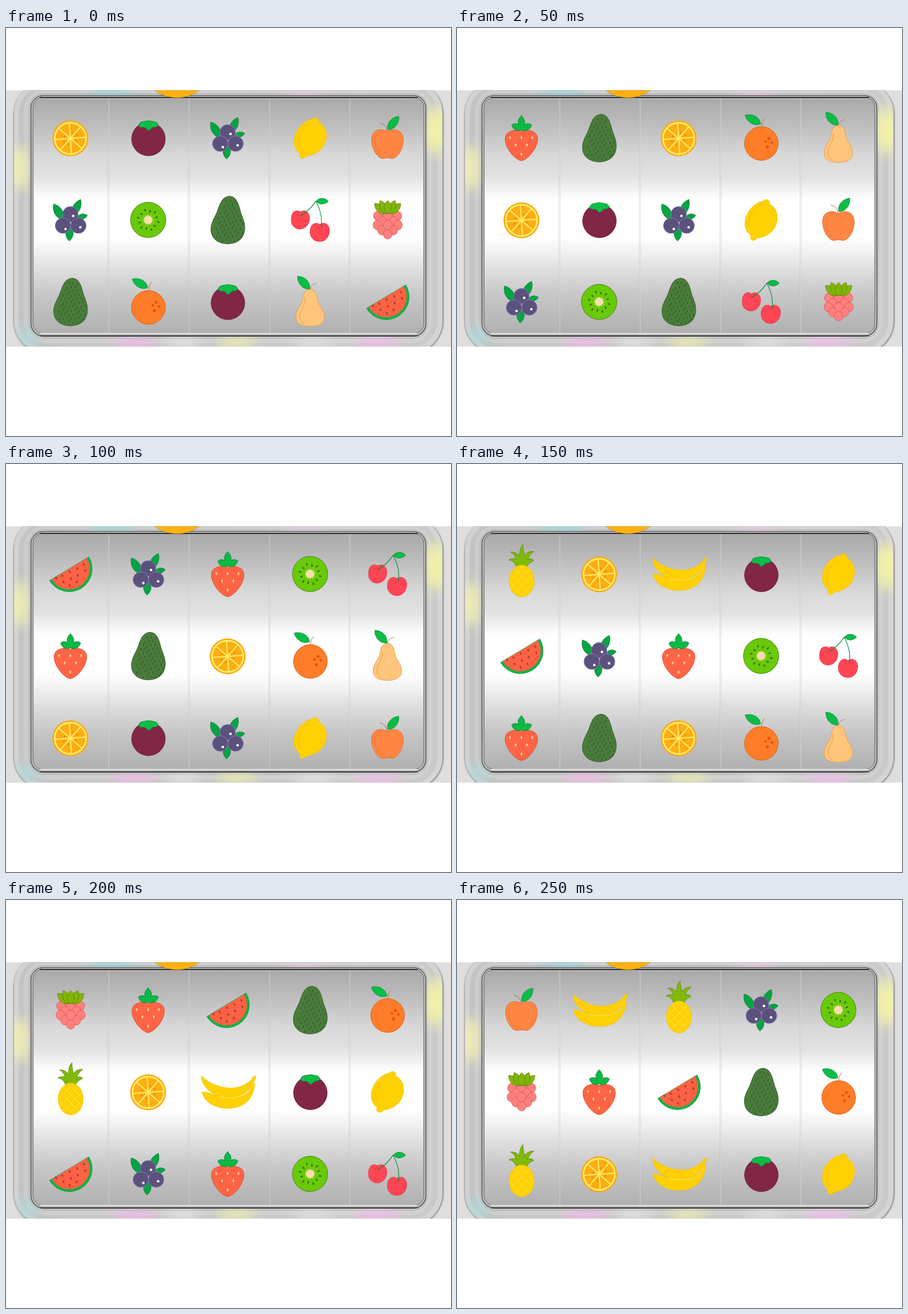
An HTML page for the animation above (0.3 s loop, 781 by 717 pixels).

```html
<!DOCTYPE html>
<html lang="en">
<head>
<meta charset="utf-8">
<title>Fruit reels</title>
<style>
html, body { margin: 0; width: 100%; height: 100%; overflow: hidden; background: #fff; }
svg { display: block; width: 100vw; height: 100vh; }
</style>
</head>
<body>
<svg id="stage" viewBox="0 0 781 717" preserveAspectRatio="none">
  <defs>
    <linearGradient id="drum" x1="0" y1="123" x2="0" y2="538" gradientUnits="userSpaceOnUse">
      <stop offset="0" stop-color="#a9a9a9"/>
      <stop offset=".12" stop-color="#bebebe"/>
      <stop offset=".25" stop-color="#d9d9d9"/>
      <stop offset=".33" stop-color="#e1e1e1"/>
      <stop offset=".37" stop-color="#ededed"/>
      <stop offset=".43" stop-color="#fff"/>
      <stop offset=".59" stop-color="#fff"/>
      <stop offset=".65" stop-color="#f2f2f2"/>
      <stop offset=".73" stop-color="#dedede"/>
      <stop offset=".84" stop-color="#c6c6c6"/>
      <stop offset="1" stop-color="#b0b0b0"/>
    </linearGradient>
    <linearGradient id="metal">
      <stop offset="0" stop-color="#c4c4c4"/>
      <stop offset=".2" stop-color="#cecece"/>
      <stop offset=".5" stop-color="#cccccc"/>
      <stop offset=".8" stop-color="#dadada"/>
      <stop offset="1" stop-color="#cecece"/>
    </linearGradient>
    <filter id="soft" x="-100%" y="-100%" width="300%" height="300%"><feGaussianBlur stdDeviation="11"/></filter>
    <filter id="edge"><feGaussianBlur stdDeviation="1.2"/></filter>
    <clipPath id="band"><rect y="109.5" width="781" height="450.5"/></clipPath>
    <clipPath id="shell"><rect x="14" y="94" width="752" height="477" rx="56"/></clipPath>
    <clipPath id="window"><rect x="48" y="123" width="685" height="415" rx="16"/></clipPath>
    <clipPath id="pineBody"><ellipse cx=".5" cy="13" rx="22" ry="28"/></clipPath>
  </defs>
  <rect width="781" height="717" fill="#fff"/>
  <g clip-path="url(#band)">
    <rect y="109" width="781" height="452" fill="#dedede"/>
    <rect x="13" y="94" width="755" height="479" rx="58" fill="#8a8a8a" filter="url(#edge)"/>
    <g clip-path="url(#shell)">
      <rect y="90" width="781" height="490" fill="url(#metal)"/>
      <g id="bevels" fill="none"></g>
      <g id="glows" filter="url(#soft)"></g>
    </g>
  </g>
  <rect x="48" y="123" width="685" height="415" rx="16" fill="url(#drum)"/>
  <g id="dividers" opacity=".5"></g>
  <g clip-path="url(#window)"><g id="reels"></g></g>
  <g id="rim" fill="none"></g>
  <g clip-path="url(#band)">
    <circle cx="300" cy="58.5" r="65" fill="#555" opacity=".35"/>
    <circle cx="300" cy="57.5" r="65" fill="#ffb00d"/>
  </g>
</svg>
<script>
const STEP = 50, STEPS = 6, PITCH = 144;
const $ = id => document.getElementById(id);
const repeat = (n, fn) => Array.from({ length: n }, (_, i) => fn(i)).join('');
const tag = (name, attrs, inner = '') =>
  `<${name} ${Object.entries(attrs).map(([k, v]) => `${k}="${v}"`).join(' ')}>${inner}</${name}>`;
const circle = (cx, cy, r, fill, stroke = 'none', width = 1) =>
  tag('circle', { cx, cy, r, fill, stroke, 'stroke-width': width });
const path = (d, fill, stroke = 'none', width = 1) =>
  tag('path', { d, fill, stroke, 'stroke-width': width, 'stroke-linecap': 'round', 'stroke-linejoin': 'round' });
const line = (d, stroke, width = 1) => path(d, 'none', stroke, width);
const oval = (x, y, rx, ry, turn, fill) =>
  tag('ellipse', { rx, ry, fill, transform: `translate(${x} ${y}) rotate(${turn})` });

// Pointed leaf from base to tip, w wide on each side
function leaf(x1, y1, x2, y2, w, fill = '#0bbd45', stroke = '#078236') {
  const len = Math.hypot(x2 - x1, y2 - y1);
  const nx = (y1 - y2) / len * w * 1.35, ny = (x2 - x1) / len * w * 1.35;
  const ax = x1 + (x2 - x1) * .2, ay = y1 + (y2 - y1) * .2;
  const bx = x1 + (x2 - x1) * .7, by = y1 + (y2 - y1) * .7;
  return path(`M${x1} ${y1}C${ax + nx} ${ay + ny} ${bx + nx} ${by + ny} ${x2} ${y2}` +
    `C${bx - nx} ${by - ny} ${ax - nx} ${ay - ny} ${x1} ${y1}Z`, fill, stroke, .8);
}

const fruits = {
  slice() {
    const spokes = repeat(8, i => tag('g', { transform: `rotate(${i * 45 - 4})` },
      line('M0 0V-26', '#ffed68', 2.2)));
    const pips = repeat(8, i => tag('g', { transform: `rotate(${i * 45 + 18})` },
      i % 4 === 3 ? '' : oval(0, -11 - i % 2 * 2, .9, 1.9, 0, '#e8760a')));
    return tag('g', { transform: 'translate(0 .7)' },
      circle(0, 0, 31.5, '#ffa70f') + circle(0, 0, 27.5, '#ffad12', '#ffed68', 2.8) + spokes + pips);
  },

  mangosteen: () => circle(.5, 1.7, 29.6, '#822645', '#6d1c39', .8) +
    path('M-17 -22Q-15 -29 -8 -29Q0 -32 9 -29Q16 -29 18 -22Q13 -18 8 -19Q4 -14 0 -13Q-4 -18 -7 -19Q-13 -17 -17 -22Z',
      '#0bbd45', '#078a36', .8),

  blueberry() {
    const green = ['#08a343', '#07803a'];
    const berry = (x, y, hx, hy) => circle(x, y, 13.6, '#5b517b', '#8478c2', 1) + circle(hx, hy, 2.2, '#fff');
    return leaf(-13, -1, -29.5, -28, 7, ...green) + leaf(4, -8, 18, -36, 6.5, ...green) +
      leaf(12, -4, 30, -8, 4.5, ...green) + leaf(-1, 12, -2, 37, 6.5, ...green) +
      berry(0, -10, 5, -7) + berry(-13, 10, -8.5, 16) + berry(14, 10, 17.5, 13);
  },

  lemon: () => path('M4 -33C5 -37 14 -37 15 -31C15 -29 15 -28 16 -27C32 -19 32 5 20 19C12 28 -2 32 -8 32C-9 37 -18 38 -19 31' +
      'C-19 29 -18 29 -18 27C-31 19 -31 -2 -21 -16C-15 -25 -5 -32 4 -33Z', '#ffd002', '#f5bf08', .8) +
    line('M-16 20C-25 10 -22 -7 -12 -18C-8 -22 -4 -25 0 -27', '#f2b90b', .8),

  apple: () => path('M0 -11C-5 -16 -19 -17 -25 -8C-32 3 -25 26 -14 34C-9 38 -4 35 0 35C5 35 9 38 14 34' +
      'C26 26 32 3 25 -8C19 -17 5 -16 0 -11Z', '#ff8543', '#dd672c', .8) +
    line('M-13 -10C-24 -6 -23 7 -20 17C-18 23 -16 26 -13 28', '#e56c2d', .8) +
    line('M0 -11C-1 -19 -5 -25 -13 -26', '#b2642e', 1) + leaf(1, -15, 20, -38, 6.8),

  kiwi() {
    const star = repeat(24, i => {
      const a = i * Math.PI / 12, r = i % 2 ? 6.5 : 9.5;
      return `${i ? 'L' : 'M'}${r * Math.sin(a)} ${-r * Math.cos(a)}`;
    }) + 'Z';
    const seeds = repeat(12, i => tag('g', { transform: `rotate(${i * 30 + 12})` },
      oval(0, i % 2 ? -18 : -15.5, 1.3, 2.5, 0, '#426510')));
    return circle(0, 0, 31, '#68ca08', '#47820f', 1) + path(star, '#ffdeac') + seeds;
  },

  avocado() {
    let fibers = '';
    for (let row = 0; row < 11; row++) {
      const y = -34 + row * 6.8;
      const half = y < 5 ? 12 + (y + 34) * .34 : Math.sqrt(Math.max(0, 1 - ((y - 14) / 29) ** 2)) * 27;
      for (let x = -24 + row % 2 * 3.5; x < 27; x += 7)
        if (Math.abs(x - 1.5) < half - 2) {
          const dy = Math.sin(x * 3 + row * 2) * 1.8;
          fibers += `M${x + 1} ${y + dy}v3.5`;
        }
    }
    return path('M3 -41.5C18 -42 20 -22 24 -10C28 0 32 10 29 22C26 36 13 42 0 42C-14 42 -27 35 -29 21' +
      'C-31 8 -24 -2 -19 -13C-14 -26 -11 -41 3 -41.5Z', '#4a7c3b', '#305d27', 1) + line(fibers, '#2d5428', 1.2);
  },

  cherry: () => path('M-17 -14C-9 -20 0 -13 -1 -1C-2 10 -10 16 -18 16C-27 16 -34 9 -33 -1C-33 -14 -25 -20 -17 -14Z', '#ff4655', '#dc3142', .8) +
    path('M17 8C25 2 35 8 34 20C33 31 26 38 17 38C7 38 0 31 0 21C0 8 9 2 17 8Z', '#ff4655', '#dc3142', .8) +
    line('M-23 -10Q-16 -5 -11 -11M11 13Q18 17 23 11', '#d62d40', .8) +
    line('M-17 -8C-6 -13 4 -24 10 -33C17 -20 22 -3 19 12', '#0a8f3b', 1.2) +
    leaf(11, -33, 32, -33, 5),

  raspberry() {
    const spots = [[-9, -13], [9, -13], [-17, -7], [17, -7], [0, -8], [-10, 2], [10, 2], [-18, 9], [18, 9],
      [-10, 18], [10, 18], [0, 25], [0, 9]];
    const crown = [[-23, -29], [23, -29], [-13, -34], [13, -34], [0, -34]];
    return spots.map(([x, y]) => tag('ellipse',
      { cx: x + .5, cy: y, rx: 7.6, ry: 8.4, fill: '#ff817d', stroke: '#df5555', 'stroke-width': .9 })).join('') +
      crown.map(([x, y]) => leaf(x * .2 + .5, -11, x + .5, y, 6, '#82b606', '#557d08')).join('');
  },

  orange: () => circle(.5, 9.7, 29.6, '#ff7d29', '#de5c0e', 1) +
    [[14, 1, 2.7], [19, 8, 2.5], [8, 6, 2.3], [11, 15.5, 2.8]].map(s => circle(...s, '#e95408')).join('') +
    line('M1 -20C1 -25 2 -30 6 -34', '#b2713d', 1) + leaf(-1, -25, -28, -40, 7),

  pear: () => path('M0 -22C10 -22 12 -12 13 -5C14 6 25 13 25 26C25 39 14 43 0 43C-14 43 -25 39 -25 26' +
      'C-25 13 -14 6 -13 -5C-12 -12 -10 -22 0 -22Z', '#ffc57b', '#dc9951', .9) +
    line('M-9 -8C-7 8 -19 13 -18 26C-18 33 -14 37 -10 39', '#dc9951', .9) +
    line('M0 -22C1 -28 5 -32 11 -32', '#b57940', 1) + leaf(-1, -23, -22, -45, 7),

  watermelon() {
    const seeds = [[-25, 7], [-14, 3], [-1, -4], [12, -10], [24, -17], [-12, 14], [1, 8], [13, 2], [26, -6], [-1, 20], [11, 14]];
    const half = (r, fill, stroke) =>
      path(`M${-r} 0A${r} ${r} 0 0 0 ${r} 0Z`, fill, stroke, .6);
    return tag('g', { transform: 'translate(-2 -9) rotate(-31)' },
      half(40.2, '#0bb545', '#078438') + half(36, '#ff6142')) +
      seeds.map(([x, y]) => oval(x, y, 1.4, 2.3, -25, '#87443a')).join('');
  },

  strawberry() {
    const seeds = [[-20, -1], [0, -1], [19, -1], [-10, 12], [10, 12], [0, 28]];
    return path('M0 -11C6 -16 17 -14 24 -9C31 -3 29 8 24 18C18 29 8 39 0 40C-8 39 -18 29 -24 18' +
        'C-29 8 -31 -3 -24 -9C-17 -14 -6 -16 0 -11Z', '#ff6545', '#d94c31', .9) +
      seeds.map(([x, y]) => path(`M${x} ${y + 3.4}C${x - 5} ${y - 4} ${x + 5} ${y - 4} ${x} ${y + 3.4}Z`, '#ffe0a1', '#e7a56c', .4)).join('') +
      path('M0 -39C6 -33 7 -28 5 -23C10 -27 15 -25 18 -23C15 -13 6 -11 0 -14C-7 -11 -15 -14 -17 -23' +
        'C-13 -26 -8 -26 -5 -23C-7 -30 -5 -34 0 -39Z', '#0bb943', '#078335', .9);
  },

  pineapple() {
    const net = repeat(9, i => {
      const x = -60 + i * 15;
      return `M${x - 20} -15L${x + 36} 41M${x + 37} -15L${x - 19} 41`;
    });
    return tag('g', { transform: 'translate(0 -.7)' },
      path('M-9 -13C-11 -19 -16 -23 -22 -24C-17 -27 -13 -27 -9 -25C-11 -31 -14 -35 -19 -38C-11 -38 -6 -35 -3 -30' +
        'C-4 -38 -2 -46 3 -51C2 -43 5 -38 5 -31C9 -37 15 -40 22 -39C16 -35 13 -30 11 -25C15 -27 19 -26 22 -23C17 -21 12 -18 10 -13Z',
        '#80ba05', '#53800b', .8) +
      tag('ellipse', { cx: .5, cy: 13, rx: 22, ry: 28, fill: '#ffd002', stroke: '#edba08', 'stroke-width': .8 }) +
      tag('g', { 'clip-path': 'url(#pineBody)' }, line(net, '#ffe64a', 1)));
  },

  banana: () => path('M-46 -28C-34 -16 -16 -8 2 -7C22 -6 34 -14 42 -22L45 -27L49 -28L49 -23L46 -18' +
      'C42 -7 30 10 2 10C-25 9 -46 -8 -46 -28Z', '#ffd002', '#efbd08', .7) +
    path('M-45 0C-35 0 -25 4 -15 8C5 13 25 10 36 0C41 -6 44 -11 46 -16L48 -14' +
      'C46 4 36 28 2 29C-25 29 -42 16 -45 0Z', '#ffd002', '#efbd08', .7) +
    line('M-15 8C5 13 25 10 36 0C40 -5 43 -10 45 -15', '#ffec72', 1)
};

// Each reel is listed upwards from the lowest visible row
const reels = [
  [113, 'avocado blueberry slice strawberry watermelon pineapple raspberry apple'],
  [249.5, 'orange kiwi mangosteen avocado blueberry slice strawberry banana'],
  [389, 'mangosteen avocado blueberry slice strawberry banana watermelon pineapple'],
  [533.7, 'pear cherry lemon orange kiwi mangosteen avocado blueberry'],
  [669.3, 'watermelon raspberry apple pear cherry lemon orange kiwi']
];
$('reels').innerHTML = reels.map(([x, names]) => names.split(' ').map((name, i) =>
  tag('g', { transform: `translate(${x} ${481.3 - PITCH * i})` }, fruits[name]())).join('')).join('');

const frame = (x, y, right, bottom, rx, stroke, width, opacity = 1) => tag('rect',
  { x, y, width: right - x, height: bottom - y, rx, stroke, 'stroke-width': width, opacity });

$('bevels').innerHTML =
  frame(18, 98, 762, 567, 53, '#d6d6d6', 9, .8) +
  frame(27, 106, 752, 558, 44, '#c4c4c4', 10, .5) +
  frame(35.5, 112, 743.5, 550, 34, '#d2d2d2', 8, .6) +
  frame(41, 116, 739, 545, 25, '#b4b4b4', 3, .6);

const glows = [
  [185, 110, 45, 8, '#8fd6dc'], [525, 110, 38, 8, '#ecc8e4'], [24, 246, 14, 40, '#f5f4b2'],
  [754, 180, 18, 42, '#f6f5a4'], [225, 555, 40, 10, '#f2b7ec'], [405, 554, 36, 10, '#eeedb0'],
  [652, 555, 42, 10, '#f1b8eb'], [34, 545, 20, 18, '#b3d6d8'], [310, 555, 34, 8, '#e8e8e8'], [540, 555, 34, 8, '#e6e6e6']
];
$('glows').innerHTML = glows.map(([x, y, rx, ry, fill]) => oval(x, y, rx, ry, 0, fill)).join('');

$('dividers').innerHTML = [180, 321, 462.5, 603].map(x =>
  line(`M${x - 1} 124V537`, '#b4b4b4', 1) + line(`M${x + .3} 124V537`, '#e8e8e8', 1) +
  line(`M${x + 1.4} 124V537`, '#c4c4c4', .8)).join('');

$('rim').innerHTML =
  frame(45.8, 120.5, 735.2, 540, 20, '#aaa', 5) +
  frame(43.8, 118.7, 736.8, 541.6, 22, '#4a4a4a', 1.3) +
  frame(45.7, 120, 735, 538.2, 20, '#d2d2d2', 1.2) +
  frame(47.4, 122, 733.3, 536.6, 17, '#666', 1) +
  line('M60 122H722', '#2c2c2c', 2) + line('M60 536.8H722', '#eee', 1.4) +
  line('M60 541H722', '#2c2c2c', 1.6);

function draw(now) {
  const step = Math.floor(now / STEP) % STEPS;
  $('reels').setAttribute('transform', `translate(0 ${PITCH * step})`);
}

const start = performance.now();
function tick() {
  draw(performance.now() - start);
  requestAnimationFrame(tick);
}
tick();
</script>
</body>
</html>
```
